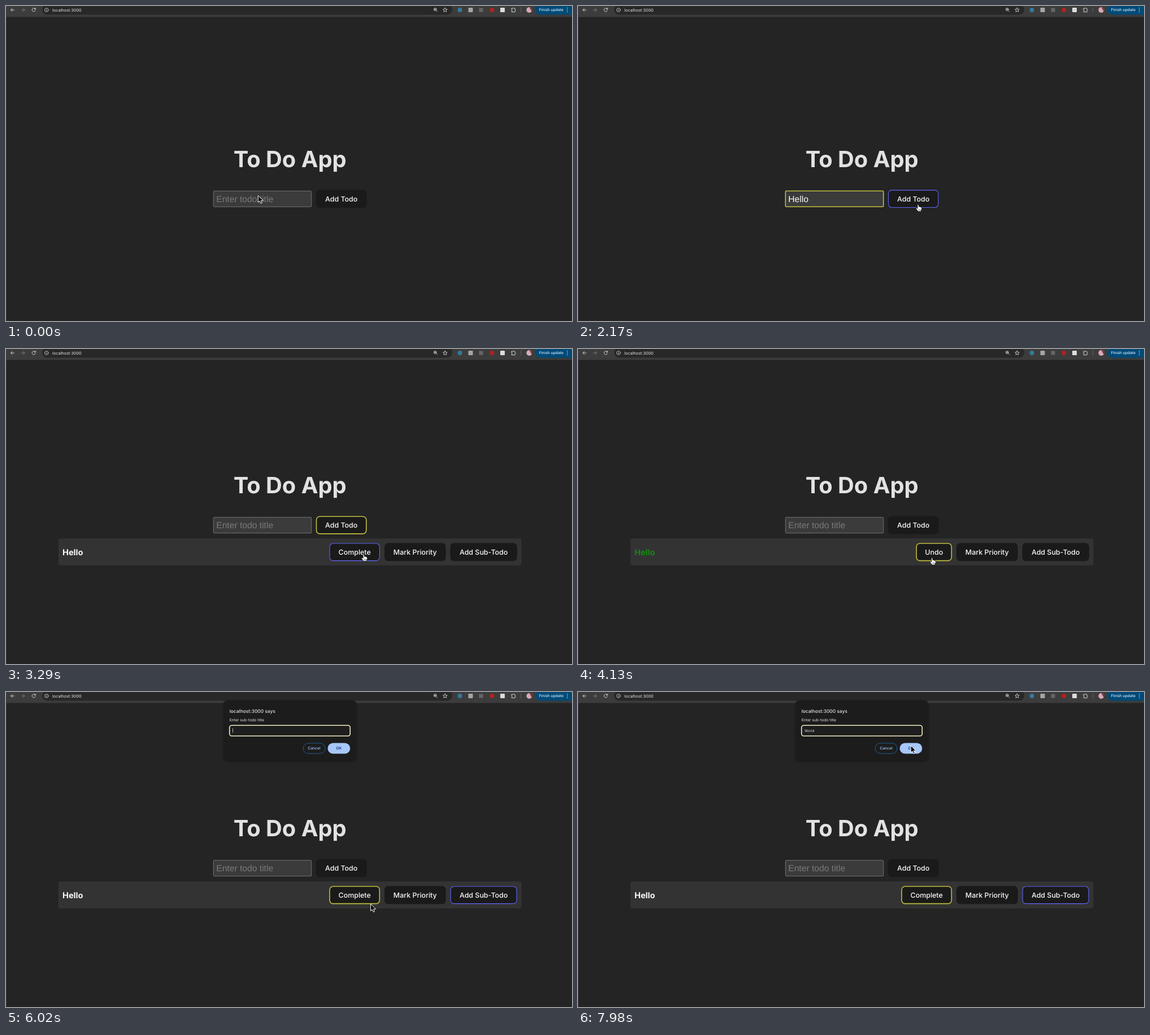
These frames come from a looping animation (1002x559 px, 8000 ms). An HTML page:

```html
<!DOCTYPE html>
<html lang="en">
<head>
<meta charset="utf-8">
<title>To Do App</title>
<style>
html, body { margin: 0; width: 100%; height: 100%; overflow: hidden; background: #242424; }
svg { display: block; width: 1002px; height: 559px; }
text { font-family: Inter, sans-serif; text-rendering: geometricPrecision; white-space: pre; }
.mid { text-anchor: middle; }
.label { font-size: 12.45px; font-weight: 500; fill: #fafafa; }
.field { font-family: "Liberation Sans", Arial, sans-serif; font-size: 15.66px; }
.small { font-size: 6.75px; fill: #e3e3e3; }
.line { fill: none; stroke: #d2d2d2; stroke-linecap: round; stroke-linejoin: round; }
</style>
</head>
<body>
<svg viewBox="0 0 1002 559">
  <defs>
    <filter id="shade" x="-10%" y="-10%" width="120%" height="125%">
      <feDropShadow dx="0" dy="1" stdDeviation="2" flood-opacity=".45"/>
    </filter>
  </defs>
  <rect width="1002" height="559" fill="#242424"/>
  <rect width="1" height="559" fill="#3a3a3a"/>

  <g id="toolbar">
    <rect width="1002" height="19.5" fill="#3c3c3c"/>
    <rect x="64" y="-3" width="726" height="18.5" rx="9" fill="#282828"/>
    <g class="line" stroke-width="1">
      <path d="M14.5 7H8.7M11.3 4.2L8.5 7l2.8 2.8"/>
      <path d="M27.2 7H33M30.4 4.2L33.2 7l-2.8 2.8" stroke="#7c7c7c" style="stroke:#7c7c7c"/>
      <path d="M52 5.4A3.1 3.1 0 1 0 52.2 7.8M52.3 3.6V5.6H50.2"/>
      <circle cx="71.7" cy="7" r="3.3" stroke-width=".8"/>
      <path d="M71.7 6.8V8.6M71.7 5.3v.05" stroke-width=".9"/>
      <circle cx="759.7" cy="6" r="2.3"/>
      <path d="M761.5 7.8l2.3 2.3M758.7 6h2M759.7 5v2" stroke-width=".8"/>
      <path d="M777.4 3.2l1.1 2.5 2.7.2-2.1 1.8.7 2.7-2.4-1.4-2.4 1.4.7-2.7-2.1-1.8 2.7-.2z" stroke-width=".9"/>
      <path d="M895.2 4.4h1.8a1.1 1.1 0 0 1 2.2 0h1.8v2a1.1 1.1 0 0 1 0 2.2v2h-5.8v-2a1.1 1.1 0 0 0 0-2.2z"/>
      <path d="M911.7 3v8" stroke-width=".8" style="stroke:#6a6a6a"/>
    </g>
    <text x="82" y="9.6" font-size="7.3" fill="#e3e3e3">localhost:3000</text>
    <circle cx="803.5" cy="7" r="4" fill="#35799b"/>
    <rect x="818.5" y="3" width="8" height="8" rx="1" fill="#a5a5a5"/>
    <rect x="837.5" y="3.5" width="7" height="7" fill="#666"/>
    <circle cx="860.3" cy="7" r="4" fill="#b5201f"/>
    <rect x="875" y="3" width="8" height="8" rx="1" fill="#dcdcdc"/>
    <circle cx="926.3" cy="7" r="5" fill="#d9a9b4"/>
    <path d="M926.3 2a5 5 0 0 1 4.2 7.6q-1.5-3.4-4.2-7.6z" fill="#6b3340"/>
    <path d="M1002 -3H946q-8 0-8 8v2.5q0 8 8 8h56z" fill="#004a77"/>
    <text class="small" x="943.7" y="9.3" font-weight="500" style="fill:#d9ebff">Finish update</text>
    <g fill="#d9ebff"><circle cx="993.6" cy="3.8" r=".8"/><circle cx="993.6" cy="7" r=".8"/><circle cx="993.6" cy="10.2" r=".8"/></g>
  </g>

  <g id="form">
    <text class="mid" x="502.7" y="285.7" font-size="39.84" font-weight="700" fill="#e2e2e2">To Do App</text>
    <rect id="input" x="367.3" y="328.3" width="173.4" height="28" rx="1.5" fill="#3b3b3b"/>
    <text id="entry" class="field" x="372.2" y="347.8"></text>
    <rect id="caret" y="334" width="1" height="17" fill="#e8e8e8"/>
  </g>

  <g id="list">
    <rect x="92.7" y="336.3" width="819.8" height="47.8" rx="4" fill="#333"/>
    <text id="item" x="100" y="365.6" font-size="14.57" font-weight="700">Hello</text>
  </g>

  <g id="dialog">
    <rect x="385.3" y="15" width="234.6" height="106.8" rx="6" fill="#1e1e1e" filter="url(#shade)"/>
    <text x="395.7" y="37.2" font-size="8.4" font-weight="500" fill="#e3e3e3">localhost:3000 says</text>
    <text class="small" x="395.7" y="52.2">Enter sub-todo title</text>
    <rect x="395.7" y="59.2" width="213.6" height="18.8" rx="4" fill="#1e1e1e" stroke="#f3ecc6" stroke-width="1.6"/>
    <text id="answer" x="401" y="70.6" font-size="6.2" fill="#e3e3e3"></text>
    <rect id="bar" y="64.5" width=".8" height="7.6" fill="#e3e3e3"/>
    <rect x="526" y="90.8" width="39" height="18.4" rx="9.2" fill="none" stroke="#1d5f95" stroke-width="1"/>
    <text class="small mid" x="545.4" y="102.4" font-weight="500" style="fill:#a8c7fa">Cancel</text>
    <rect x="569.5" y="90.4" width="39.8" height="19.2" rx="9.6" fill="#a8c7fa"/>
    <text class="small mid" x="589.2" y="102.4" font-weight="500" style="fill:#062e6f">OK</text>
  </g>

  <path id="arrow" d="M0 0V12.3L2.8 9.7 4.7 14.1 6.8 13.2 5 8.9H9z" fill="#000" stroke="#fff" stroke-width="1" stroke-linejoin="round"/>
  <g id="hand">
    <path d="M-1.2 .9Q0-.6 1 .9L1.5 4.2Q2.8 3.4 3.5 4.6 4.7 4 5.2 5.3 6.7 5 6.7 6.8 6.8 9.2 5.5 10.8V12.6H-.2Q-.8 10.7-2.8 8.7-4.3 6.8-2.9 6.4-1.8 6.2-.6 7.4z" fill="#fff" stroke="#111" stroke-width=".8" stroke-linejoin="round"/>
    <path d="M1.2 8.6v2.3M2.8 8.6v2.3M4.4 8.6v2.3" stroke="#111" stroke-width=".6"/>
  </g>
</svg>
<script>
const LOOP = 8000, STEP = 70, YELLOW = '#c2be42', BLUE = '#646cff';
const $ = id => document.getElementById(id);
const set = (el, o) => { for (const k in o) el.setAttribute(k, o[k]); };
const show = (el, on) => set(el, { visibility: on ? 'visible' : 'hidden' });
const smooth = (t, from, span) => {
  const u = Math.min(1, Math.max(0, (t - from) / span));
  return u * u * (3 - 2 * u);
};
const within = (t, a, b) => t >= a && t < b;

function button(parent, x, y, w, label) {
  const make = (tag, o) => {
    const el = document.createElementNS('http://www.w3.org/2000/svg', tag);
    set(el, o);
    g.append(el);
    return el;
  };
  const g = document.createElementNS('http://www.w3.org/2000/svg', 'g');
  $(parent).append(g);
  make('rect', { x, y, width: w, height: 32, rx: 6.5, fill: '#1a1a1a' });
  const edge = make('rect', { x: x + .7, y: y + .7, width: w - 1.4, height: 30.6, rx: 6, fill: 'none' });
  make('text', { class: 'label mid', x: x + w / 2, y: y + 20.5 }).textContent = label;
  return { g, edge };
}

const add = button('form', 548.8, 326.2, 89.7, 'Add Todo');
const complete = button('list', 572.3, 344.3, 89.7, 'Complete');
const undo = button('list', 598.4, 344.3, 63.6, 'Undo');
const priority = button('list', 670, 344.3, 108.6, 'Mark Priority');
const sub = button('list', 786.4, 344.3, 118.4, 'Add Sub-Todo');

// Focus ring wins over the fading hover border.
function edge(b, focus, hover) {
  set(b.edge, {
    stroke: focus ? YELLOW : BLUE,
    'stroke-width': focus ? 1.6 : 1.1,
    'stroke-opacity': focus ? 1 : hover
  });
}

const typed = (t, word, times) => word.slice(0, times.filter(k => t >= k).length);

// Pointer stops: time, x, y
const path = [
  [0, 446.3, 336.3], [1820, 450, 338], [1960, 545, 346], [2170, 602, 352],
  [3010, 603, 353], [3290, 633, 364], [3570, 626.7, 370.5],
  [5180, 626.7, 370.5], [5320, 690, 370], [5460, 816.7, 360.5], [5600, 824, 361],
  [5810, 824, 361], [5880, 795, 364], [6020, 645.6, 376.3], [6160, 602, 270], [6230, 597, 189],
  [7630, 596, 188], [7770, 593, 140], [7980, 589.2, 95.3]
];
function pointer(t) {
  const i = Math.max(1, path.findIndex(p => p[0] >= t));
  const [a, b] = [path[i - 1], path[i]];
  const u = (t - a[0]) / (b[0] - a[0]);
  const still = b[0] - a[0] > 700;
  return [1, 2].map(k => still ? a[k] : a[k] + (b[k] - a[k]) * u);
}

function draw(t) {
  const listed = t >= 2380, done = within(t, 4130, 5110);

  set($('form'), { transform: `translate(0 ${listed ? -29.6 : 0})` });
  const focus = within(t, 70, 2380);
  set($('input'), {
    stroke: focus ? YELLOW : '#858585',
    'stroke-width': focus ? (t < 420 ? 1.3 : 1.6) : .8
  });
  const word = listed ? '' : typed(t, 'Hello', [910, 1120, 1190, 1330, 1470]);
  const entry = $('entry');
  entry.textContent = word || 'Enter todo title';
  set(entry, { fill: word ? '#fafafa' : '#7a7a7a' });
  show($('caret'), within(t, 140, 420) || within(t, 910, 1820));
  set($('caret'), { x: 372 + (word ? entry.getComputedTextLength() : 0) });
  edge(add, within(t, 2380, 4130), listed ? 0 : smooth(t, 1950, 250));

  set($('list'), { display: listed ? 'inline' : 'none' });
  set($('item'), { fill: done ? '#138a13' : '#fafafa' });
  set(complete.g, { display: done ? 'none' : 'inline' });
  set(undo.g, { display: done ? 'inline' : 'none' });
  edge(complete, t >= 5110, smooth(t, 2380, 250));
  edge(undo, true);
  edge(priority, false, Math.max(0, .3 * (1 - Math.abs(t - 5400) / 110)));
  edge(sub, false, smooth(t, 5380, 230));

  set($('dialog'), { opacity: Math.min(1, Math.max(0, (t - 5740) / 210)) });
  const answer = $('answer');
  answer.textContent = typed(t, 'World', [6720, 7000, 7070, 7140, 7280]);
  set($('bar'), { x: 401 + (answer.textContent ? answer.getComputedTextLength() : 0) });
  show($('bar'), within(t, 5880, 6510) || within(t, 6720, 7630));

  const [x, y] = pointer(t);
  const seen = t < 910 || within(t, 1820, 6300) || t >= 7630;
  const hand = within(t, 1820, 5880) && x > 548;
  for (const id of ['arrow', 'hand']) {
    show($(id), seen && hand === (id === 'hand'));
    set($(id), { transform: `translate(${x} ${y})` });
  }
}

const start = performance.now();
function tick() {
  const t = (performance.now() - start) % LOOP;
  draw(Math.floor(t / STEP) * STEP);
  requestAnimationFrame(tick);
}
tick();
</script>
</body>
</html>
```
